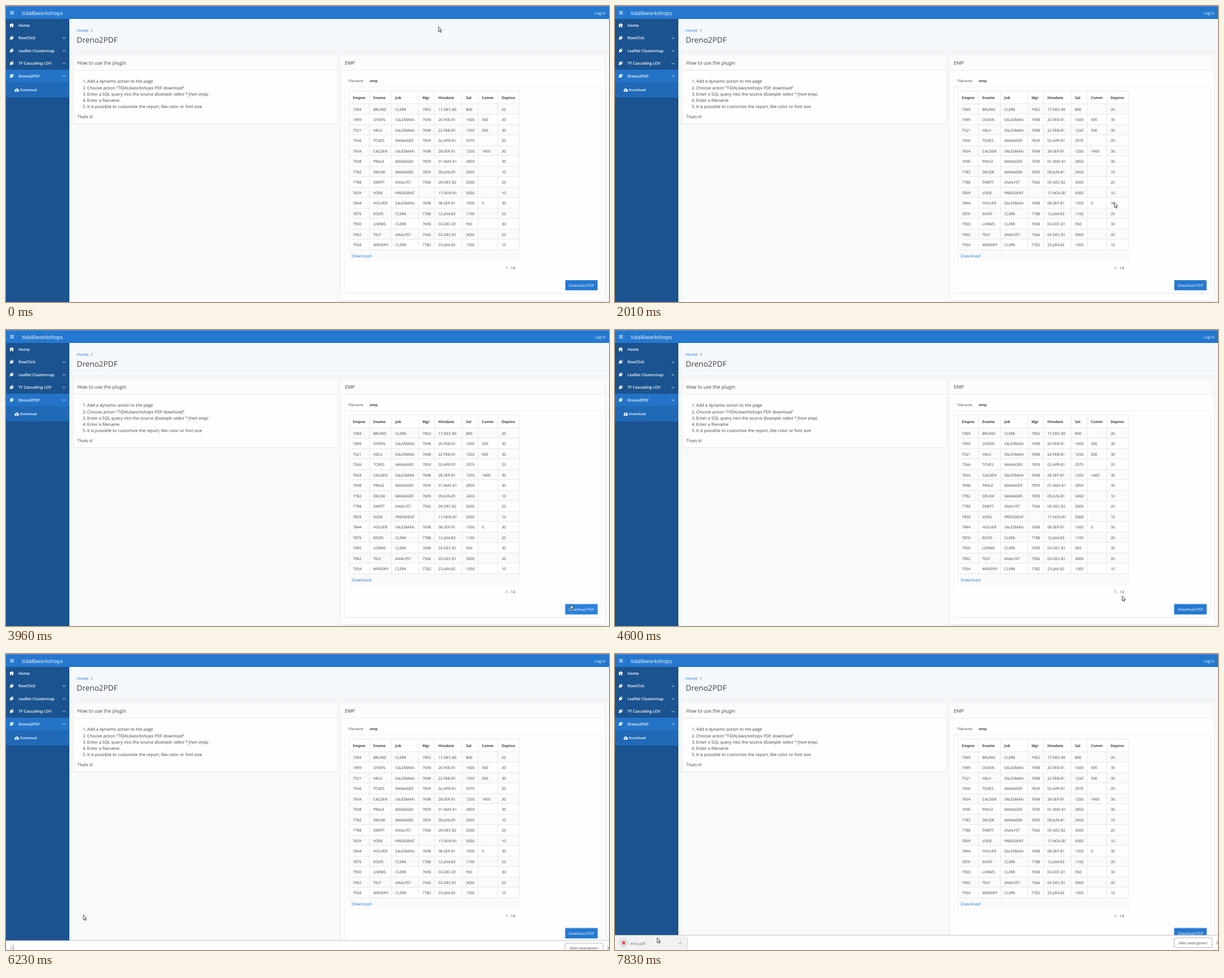
Animation, 1066 px wide and 525 px high, one loop 8000 ms. Source, as an HTML page:

```html
<!DOCTYPE html>
<html lang="en">
<head>
<meta charset="utf-8">
<title>Report download</title>
<style>
html, body { margin: 0; width: 100%; height: 100%; overflow: hidden; background: #f8f9f9; }
svg { display: block; width: 100%; height: 100%; }
text { font-family: "Open Sans", "Noto Sans", sans-serif; text-rendering: geometricPrecision; white-space: pre; }
</style>
</head>
<body>
<svg id="stage" viewBox="0 0 1066 525" preserveAspectRatio="none"></svg>
<script>
const BLUE = '#2578cf', NAVY = '#1a538f', INK = '#404040', LINE = '#e8e8e8';
const LOOP = 8000, SIDE = 112;

const rect = (x, y, w, h, fill, extra = '') =>
  `<rect x="${x}" y="${y}" width="${w}" height="${h}" fill="${fill}" ${extra}/>`;
const path = (d, stroke, width = 1, extra = '') =>
  `<path d="${d}" fill="none" stroke="${stroke}" stroke-width="${width}" ${extra}/>`;
// cy is the middle of the capital letters
const label = (x, cy, size, str, fill = INK, weight = 400) =>
  `<text x="${x}" y="${(cy + size * 0.36).toFixed(2)}" font-size="${size}" fill="${fill}" font-weight="${weight}">${str}</text>`;

function panel(x, y, w, h, title) {
  return rect(x, y + 1, w, h, '#000', 'opacity=".04"') +
    rect(x - .5, y - .5, w, h, '#fefefe', `stroke="#ebebeb"`) +
    rect(x, y, w - 1, 26.5, '#fcfcfc') +
    path(`M${x} ${y + 26.5}h${w - 1}`, LINE) +
    label(x + 7, y + 13.7, 8.54, title);
}

const plug = y => `<g transform="translate(10 ${y}) rotate(45) scale(.92)" fill="#fff">
  <path d="M-3 -1.6h6v1.6a3 3 0 0 1 -6 0z"/><path d="M-2 -4.6h1.2v3h-1.2zM.8 -4.6h1.2v3h-1.2zM-.6 2.5h1.2v2.5h-1.2z"/></g>`;
const house = `<path d="M10 30.2l4.2 3.8h-1.2v3.7h-2.2v-2.6h-1.6v2.6h-2.2v-3.7h-1.2z" fill="#fff"/>`;
const cloud = `<path d="M16.6 152a1.9 1.9 0 0 1 -.2 -3.7a2.4 2.4 0 0 1 4.5 -.7a2.2 2.2 0 0 1 -.3 4.4z" fill="#fff"/>
  <path d="M18.1 148h1v1.6h1.1l-1.6 1.7l-1.6 -1.7h1.1z" fill="#1f69b7"/>`;

function chrome() {
  let s = rect(0, 0, 1066, 23, BLUE) + rect(0, 0, 1066, 1, '#6c96c6') +
    path('M22.5 1v22', '#206ab8') +
    path('M7.3 9.8h6.6M7.3 12h6.6M7.3 14.2h6.6', '#fff', 1.1) +
    label(28.5, 12.3, 9.4, 'tidal6workshops', '#fff') +
    label(1041, 12.3, 6.7, 'Log In', '#fff');
  s += rect(0, 23, SIDE, 502, NAVY) + rect(0, 113, SIDE, 22, '#2373c7') +
    rect(0, 135, SIDE, 27, '#1f69b7') + house + cloud;
  ['Home', 'RowClick', 'Leaflet Clustermap', 'TF Cascading LOV', 'Dreno2PDF'].forEach((name, i) => {
    const y = 34.2 + i * 22.45;
    s += label(22, y, 6.95, name, '#fff', 600);
    if (i) s += plug(y) + path(`M100 ${y - 1}l2.5 2.4l2.5 -2.4`, '#fff', .9);
  });
  return s + label(24.8, 149, 6.15, 'Download', '#fff', 600);
}

function guide() {
  let s = rect(SIDE, 23, 954, 58, '#f5f9fd') + path(`M${SIDE} 81.5H1066`, '#e3e7ea') +
    label(125, 43.5, 7.4, 'Home', BLUE) + label(150.5, 43.5, 7.4, '/') +
    label(125, 60, 13.6, 'Dreno2PDF') +
    panel(119, 87, 468, 122, 'How to use the plugin');
  ['Add a dynamic action to the page',
   'Choose action “TIDAL6workshops PDF download”',
   'Enter a SQL query into the source <tspan font-style="italic">(Example: select * from emp)</tspan>',
   'Enter a filename',
   'It is possible to customize the report, like color or font size'].forEach((line, i) => {
    const y = 133.6 + i * 11.2;
    s += label(135.8, y, 7.5, i + 1 + '.') + label(143.5, y, 7.5, line);
  });
  return s + label(126, 196.2, 7.5, 'Thats it!');
}

const HEAD = 'Empno Ename Job Mgr Hiredate Sal Comm Deptno'.split(' ');
const ROWS = `7369 BRUND CLERK 7902 17-DEC-80 800 _ 20
7499 OSVEN SALESMAN 7698 20-FEB-81 1600 300 30
7521 HELV SALESMAN 7698 22-FEB-81 1250 500 30
7566 TOVES MANAGER 7839 02-APR-81 2975 _ 20
7654 CALDEN SALESMAN 7698 28-SEP-81 1250 1400 30
7698 PRALE MANAGER 7839 01-MAY-81 2850 _ 30
7782 DRUSK MANAGER 7839 09-JUN-81 2450 _ 10
7788 SWEFT ANALYST 7566 09-DEC-82 3000 _ 20
7839 VOSK PRESIDENT _ 17-NOV-81 5000 _ 10
7844 HOLVER SALESMAN 7698 08-SEP-81 1500 0 30
7876 EDVIS CLERK 7788 12-JAN-83 1100 _ 20
7900 LORMS CLERK 7698 03-DEC-81 950 _ 30
7902 TELF ANALYST 7566 03-DEC-81 3000 _ 20
7934 WENDRY CLERK 7782 23-JAN-82 1300 _ 10`.split('\n').map(r => r.split(' '));
const EDGES = [606.5, 642.5, 681.5, 729.5, 757.5, 806.5, 834.5, 869.5, 907.5];
const ROW_H = 18.49;

function report() {
  let s = panel(592, 87, 468, 436, 'EMP') +
    label(605.5, 133, 6.2, 'Filename') + label(643, 133, 6.4, 'emp', INK, 700) +
    rect(599.5, 143.5, 453, 366, '#fefefe', `stroke="#f0f0f0"`) + path('M600 509.5h452', '#e4e4e4') +
    rect(606, 433, 302, 21, '#fafafa');
  ROWS.forEach((row, r) => {
    const top = 174 + r * ROW_H;
    if (r % 2 === 0) s += rect(606.5, top, 301, ROW_H, '#fbfbfb');
    s += path(`M606 ${Math.round(top) - .5}H908`, LINE);
    row.forEach((cell, c) => {
      if (cell !== '_') s += label(EDGES[c] + 6.8, 183.6 + r * ROW_H, 6.6, cell);
    });
  });
  s += path('M606 150.5H908M606 432.5H908', LINE);
  EDGES.forEach(x => s += path(`M${x} 150V433`, LINE));
  HEAD.forEach((name, c) => s += label(EDGES[c] + 6.8, 163, 6.45, name, INK, 700));
  return s + label(611, 443.5, 7.4, 'Download', BLUE) + label(883, 465, 6.65, '1 - 14');
}

const button = rect(988.8, 486.3, 57, 18, BLUE, 'id="btn" rx="1"') +
  rect(988.4, 485.9, 57.8, 18.8, 'none', 'id="ring" rx="1.2" stroke="#7db4ee" stroke-width=".8"') +
  label(995, 495.7, 6.55, 'Download PDF', '#fff');

const shelf = `<g id="shelf">` + rect(0, 499, 1066, 27, '#fefefe') + path('M0 498.8H1066', '#b9bdc1', .9) +
  `<clipPath id="crop">` + rect(0, 499, 129, 27, '#000', 'id="cropBox"') + `</clipPath>` +
  `<g clip-path="url(#crop)">` + rect(2, 500, 127, 24.5, '#f1f1f1', 'id="hover" rx="1"') +
  `<circle cx="15.3" cy="512.3" r="6.9" fill="#f4f8fd" stroke="#8fb4dc" stroke-width="1"/>` +
  rect(12.2, 509, 6.2, 6.6, '#e4605c', 'rx=".6"') +
  label(27, 514, 6.85, 'emp.pdf', '#6a6a6a') + `</g>` +
  path('M-2.5 1.2l2.5 -2.4l2.5 2.4', '#666', .9, 'id="caret"') +
  path('M0 502.5v20', '#d4d4d4', 1, 'id="split"') +
  rect(988.5, 503.5, 67, 17, '#fff', 'rx="1.5" stroke="#b5b5b5"') +
  label(996.3, 512.4, 6.77, 'Alles weergeven', '#505050') +
  path('M1063.2 509.2l5.6 5.6M1063.2 514.8l5.6 -5.6', '#606060', 1) + `</g>`;

const pointer = `<path id="pointer" d="M0 0V8.8L2 7L3.4 10.1L4.6 9.6L3.2 6.5H6.1Z" fill="#fff" stroke="#111" stroke-width=".75" stroke-linejoin="round"/>`;

document.getElementById('stage').innerHTML =
  guide() + report() + button + chrome() + shelf + pointer;

const el = id => document.getElementById(id);
const ring = el('ring'), btn = el('btn'), bar = el('shelf'), cropBox = el('cropBox'),
  hover = el('hover'), caret = el('caret'), split = el('split'), arrow = el('pointer');

const START = [764.5, 36.8];
// first step, last step, number of steps, end x, end y, ease-out power
const MOVES = [
  [550, 1150, 9, 702, 169, 1.2],
  [1470, 1700, 4, 857, 314, 1.2],
  [2010, 2470, 7, 954, 444, 2],
  [2790, 3570, 11, 998, 487, 2],
  [4600, 4740, 3, 756, 450, 1.34],
  [5050, 5200, 3, 475, 444, 1.2],
  [5430, 5580, 3, 190, 450, 1.2],
  [5970, 5970, 1, 161, 453.7, 1],
  [6050, 6610, 8, 105, 474.8, 1.2],
  [6690, 6760, 2, 100, 486, 1],
  [6820, 7590, 11, 69, 499, 1.5],
  [7830, 7830, 1, 74.6, 503.2, 1]
];

const clamp = v => Math.max(0, Math.min(1, v));
const easeOut = (u, p) => 1 - Math.pow(1 - clamp(u), p);

function pointerAt(t) {
  let [x, y] = START;
  for (const [t0, t1, n, ex, ey, p] of MOVES) {
    if (t < t0) break;
    const step = n > 1 ? Math.floor((t - t0) / (t1 - t0) * (n - 1) + 1e-6) : 0;
    const k = easeOut((step + 1) / n, p);
    x += (ex - x) * k;
    y += (ey - y) * k;
  }
  return [x, y];
}

function draw(t) {
  const [x, y] = pointerAt(t);
  arrow.setAttribute('transform', `translate(${x.toFixed(2)} ${y.toFixed(2)})`);

  const over = t >= 3490 && t < 4600, pressed = t >= 3810 && t < 3960;
  btn.setAttribute('fill', pressed ? '#1f69b7' : over ? '#2b80d9' : BLUE);
  ring.setAttribute('opacity', t < 3810 ? 0 : t < 3960 ? .5 : t < 4050 ? .8 : 1);

  const rise = easeOut((t - 6130) / 240, 2);
  bar.setAttribute('transform', `translate(0 ${(28 * (1 - rise)).toFixed(2)})`);
  bar.setAttribute('visibility', rise > 0 ? 'visible' : 'hidden');

  const w = 128.5 * easeOut((t - 6200) / 560, 2);
  cropBox.setAttribute('width', w.toFixed(2));
  hover.setAttribute('opacity', t > 6800 && y > 494 ? 1 : 0);
  split.setAttribute('transform', `translate(${w.toFixed(2)} 0)`);
  caret.setAttribute('transform', `translate(${(w - 13.2).toFixed(2)} 513)`);
  caret.setAttribute('opacity', w > 20 ? 1 : 0);
}

const begin = performance.now();
function tick() {
  draw((performance.now() - begin) % LOOP);
  requestAnimationFrame(tick);
}
tick();
</script>
</body>
</html>
```
